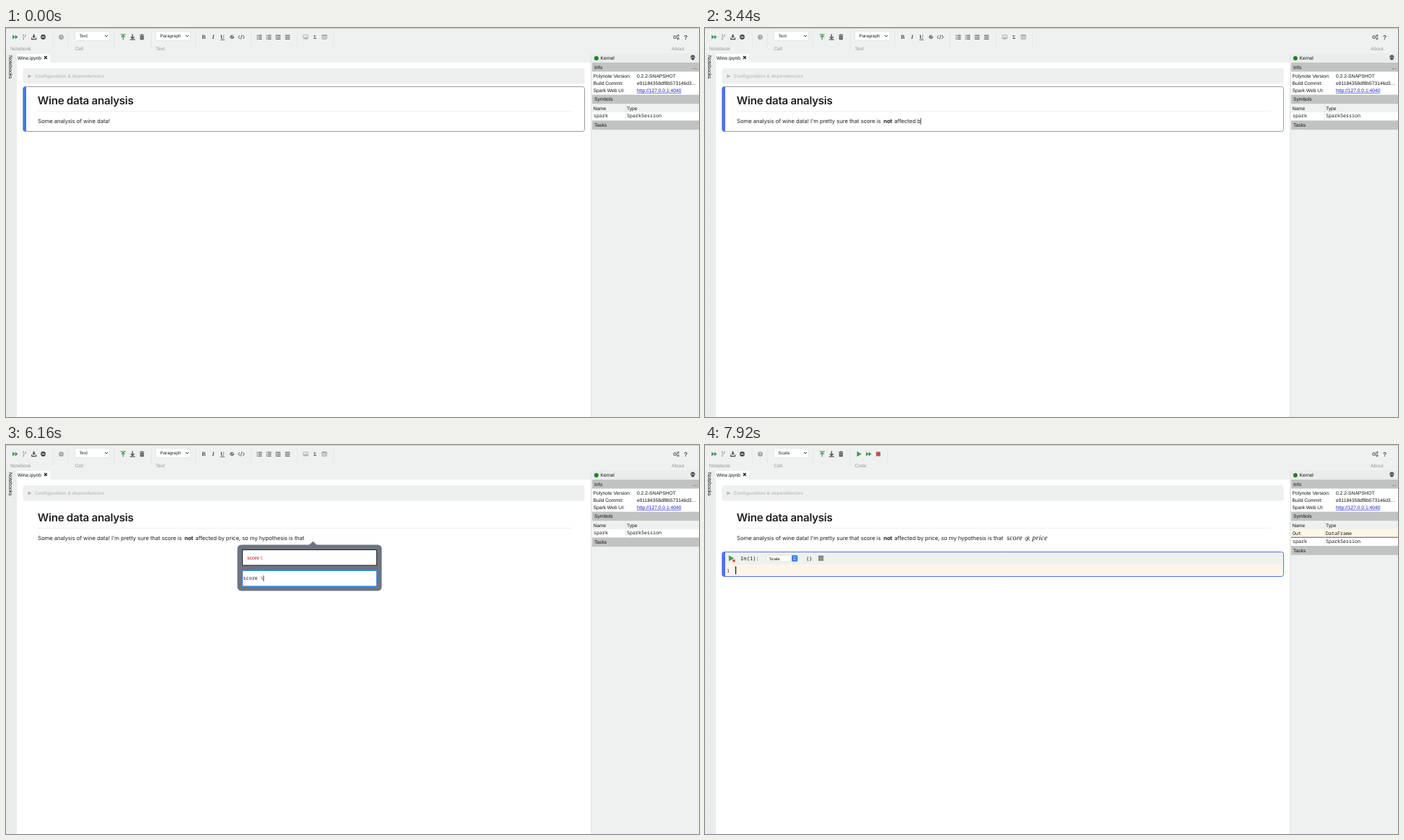
Recreate the animation shown at these times as an HTML page with a canvas. Size 960 by 540 pixels, loop 8000 ms.

```html
<!DOCTYPE html>
<html lang="en">
<head>
<meta charset="utf-8">
<title>Notebook</title>
<style>
  html, body { margin: 0; width: 100%; height: 100%; overflow: hidden; background: #fff; }
  canvas { display: block; width: 960px; height: 540px; }
</style>
</head>
<body>
<canvas id="stage"></canvas>
<script>
const LOOP = 8000, STEP = 80;
const SANS = '"Liberation Sans", Arial, sans-serif';
const INTER = 'Inter, sans-serif';
const MONO = '"Noto Sans Mono", "DejaVu Sans Mono", monospace';
const SERIF = '"Liberation Serif", Times, serif';
const UI = `6.7px ${SANS}`, CODE = `6.67px ${MONO}`, BODY = `7.75px ${INTER}`;
const BG = '#eff1f0', DARK = '#4b4b4b', PALE = '#a4a6a5', GREEN = '#479b55', BLUE = '#4b74e6';
const CREAM = '#fdf6e8';

const canvas = document.getElementById('stage');
const ctx = canvas.getContext('2d');
const dpr = window.devicePixelRatio || 1;
canvas.width = 960 * dpr;
canvas.height = 540 * dpr;
ctx.scale(dpr, dpr);
ctx.textRendering = 'geometricPrecision';

function rect(x, y, w, h, fill) {
  ctx.fillStyle = fill;
  ctx.fillRect(x, y, w, h);
}

function box(x, y, w, h, r, fill, stroke, weight = 1) {
  ctx.beginPath();
  ctx.roundRect(x, y, w, h, r);
  if (fill) { ctx.fillStyle = fill; ctx.fill(); }
  if (stroke) { ctx.strokeStyle = stroke; ctx.lineWidth = weight; ctx.stroke(); }
}

function disc(x, y, r, fill) {
  ctx.beginPath();
  ctx.arc(x, y, r, 0, 7);
  ctx.fillStyle = fill;
  ctx.fill();
}

function poly(fill, ...p) {
  ctx.beginPath();
  for (let i = 0; i < p.length; i += 2) ctx.lineTo(p[i], p[i + 1]);
  ctx.closePath();
  ctx.fillStyle = fill;
  ctx.fill();
}

function line(stroke, weight, ...p) {
  ctx.beginPath();
  for (let i = 0; i < p.length; i += 2) ctx.lineTo(p[i], p[i + 1]);
  ctx.strokeStyle = stroke;
  ctx.lineWidth = weight;
  ctx.stroke();
}

// Draws text on a baseline and returns its right edge.
function text(s, x, y, font = UI, fill = '#111', spacing = 0, align = 'left') {
  ctx.font = font;
  ctx.letterSpacing = spacing + 'px';
  ctx.textAlign = align;
  ctx.fillStyle = fill;
  ctx.fillText(s, x, y);
  return x + ctx.measureText(s).width;
}

function stripes(x, y, w, h) {
  rect(x, y, w, h, '#f0f1f1');
  for (let i = 0; i < h; i += 2) rect(x, y + i, w, 1, '#e5e7e6');
}

function separator(x) {
  for (let y = 5; y < 28; y += 2) rect(x, y, 1, 1, '#dcdedd');
}

function triangle(x, y, w, h, fill) {
  poly(fill, x, y - h / 2, x + w, y, x, y + h / 2);
}

function select(label, x, w) {
  box(x + .5, 4.5, w - 1, 13, 2, '#fff', '#dedfdf', .7);
  text(label, x + 6.5, 13.2, `6.2px ${SANS}`, '#222');
  line('#333', 1, x + w - 7, 10, x + w - 5, 12, x + w - 3, 10);
}

function fastForward(x, y) {
  triangle(x, y, 4, 6, GREEN);
  triangle(x + 3.7, y, 4, 6, GREEN);
}

function barArrow(x, dir, color) {
  const y = 12.5;
  rect(x - 3.5, dir < 0 ? 8.5 : 15.5, 7, 1.2, color);
  line(color, 1.3, x, y - 3 * dir + (dir < 0 ? 1 : -1), x, y + 2 * dir);
  line(color, 1.3, x - 2.5, y - .2 * dir, x, y + 2.2 * dir, x + 2.5, y - .2 * dir);
}

function listIcon(x, kind) {
  for (let i = 0; i < 3; i++) {
    const y = 9.7 + i * 2.5;
    const inset = kind === 'indent' || kind === 'outdent';
    const full = inset && i !== 1;
    rect(full ? x - 3.3 : x - 1.4, y, full ? 6.6 : 4.8, 1.1, DARK);
    if (kind === 'bullet') rect(x - 3.5, y, 1.2, 1.2, DARK);
    if (kind === 'number') rect(x - 3.2, y - .2, .8, 1.6, DARK);
  }
  if (kind === 'indent') triangle(x - 3.4, 12.7, 1.8, 2.6, DARK);
  if (kind === 'outdent') triangle(x - 1.7, 12.7, -1.8, 2.6, DARK);
}

function gear(x, y, r) {
  ctx.beginPath();
  ctx.arc(x, y, r, 0, 7);
  ctx.setLineDash([.9, .5]);
  ctx.strokeStyle = DARK;
  ctx.lineWidth = 1.5;
  ctx.stroke();
  ctx.setLineDash([]);
}

function toolbar(code, bold) {
  rect(0, 0, 960, 36, BG);
  rect(0, 0, 960, 1, '#c9cbca');

  fastForward(9, 12.5);
  line(PALE, .8, 24, 9.5, 24, 15.5);
  line(PALE, .8, 24, 13.5, 27, 12, 27, 10);
  for (const [x, y] of [[24, 9.5], [24, 15.5], [27, 10]]) disc(x, y, .9, PALE);
  rect(37.7, 8.8, 1.8, 3, DARK);
  poly(DARK, 36, 11.4, 41.2, 11.4, 38.6, 14);
  line(DARK, 1.3, 35.7, 13.5, 35.7, 15.6, 41.6, 15.6, 41.6, 13.5);
  disc(51.5, 12.5, 3.4, DARK);
  rect(49.6, 12, 3.8, 1.1, BG);
  disc(76.5, 12.7, 3.4, PALE);
  line(BG, .8, 76.5, 10.7, 76.5, 12.9, 78, 13.4);
  [65, 86, 149, 201].forEach(separator);

  select(code ? 'Scala' : 'Text', 95, 49);
  barArrow(162.3, -1, GREEN);
  barArrow(175.3, 1, DARK);
  rect(185.3, 9.3, 6, 1, DARK);
  rect(187.2, 8.5, 2.2, 1, DARK);
  rect(185.8, 10.8, 5, 5.4, DARK);
  line(BG, .5, 187.4, 11.6, 187.4, 15.2);
  line(BG, .5, 189.2, 11.6, 189.2, 15.2);

  text('Notebook', 6, 30.6, UI, '#929493');
  text('Cell', 95.5, 30.6, UI, '#929493');
  text(code ? 'Code' : 'Text', 207.5, 30.6, UI, '#929493');
  text('About', 922, 30.6, UI, '#929493');
  if (code) {
    triangle(210.5, 12.5, 6.5, 7.4, GREEN);
    fastForward(223, 12.5);
    rect(237, 9.5, 6, 6, '#c9514b');
    separator(252);
  } else textTools(bold);

  gear(926.7, 12.6, 1.8);
  gear(931, 10.6, 1);
  gear(931, 14.7, 1);
  text('?', 941.5, 15.6, `bold 8.5px ${SANS}`, DARK, 0, 'center');
}

function textTools(bold) {
  select('Paragraph', 207, 49);
  if (bold) box(268, 6, 12, 13, 2, '#fff');
  const icon = (s, x, style) => text(s, x, 15.4, `${style} 8px ${SERIF}`, DARK, 0, 'center');
  icon('B', 274, 'bold');
  icon('I', 287, 'italic bold');
  icon('U', 300, 'bold');
  rect(297, 16.1, 6, .8, DARK);
  text('S', 313, 15.3, `bold 7.5px ${SANS}`, DARK, 0, 'center');
  rect(309.6, 12.3, 6.8, .8, DARK);
  line(DARK, 1, 323.8, 10.2, 321.8, 12.6, 323.8, 15);
  line(DARK, 1, 328.2, 10.2, 330.2, 12.6, 328.2, 15);
  line(DARK, .9, 326.8, 9.5, 325.2, 15.7);

  ['bullet', 'number', 'indent', 'outdent'].forEach((kind, i) => listIcon(351 + 13 * i, kind));
  box(411.8, 9.9, 6.6, 5.2, .5, null, PALE, .9);
  poly(PALE, 412.5, 14.6, 414.2, 12.3, 415.3, 13.3, 416.5, 12, 417.8, 14.6);
  text('Σ', 428, 15.1, `bold 7px ${SERIF}`, DARK, 0, 'center');
  box(437.8, 9.6, 6.6, 5.8, .5, null, PALE, .9);
  rect(437.8, 9.6, 6.6, 1.5, PALE);
  line(PALE, .7, 438, 13.1, 444.2, 13.1);
  line(PALE, .7, 440, 10, 440, 15.2);
  line(PALE, .7, 442.2, 10, 442.2, 15.2);
  [262, 339, 403, 453].forEach(separator);
}

function leftStrip() {
  stripes(0, 36, 15, 504);
  ctx.save();
  ctx.translate(4.2, 38);
  ctx.rotate(Math.PI / 2);
  text('Notebooks', 0, 0, `6.8px ${SANS}`);
  ctx.restore();
  rect(15, 35, 795, 13, BG);
  rect(15, 36, 46, 12, '#fff');
  text('Wine.ipynb', 16, 44.2, `6.67px ${SANS}`);
  line('#222', 1.3, 53, 39, 56.8, 43);
  line('#222', 1.3, 56.8, 39, 53, 43);
}

function section(label, y) {
  rect(812, y, 148, 12.7, '#c1c2c2');
  text(label, 815, y + 8.6);
}

function symbolRow(y, name, type) {
  text(name, 814, y + 7.4, CODE);
  text(type, 860, y + 7.4, CODE);
}

function kernelPanel(hasOut) {
  rect(810, 36, 150, 504, BG);
  rect(810, 36, 1, 504, '#e2e4e3');
  stripes(812, 36, 148, 12);
  disc(817.8, 42, 3, '#1c8420');
  text('Kernel', 823.5, 43.7);
  disc(951.4, 40.6, 3, DARK);
  rect(949.8, 42, 3.3, 2.4, DARK);
  disc(950.2, 40.8, .8, BG);
  disc(952.6, 40.8, .8, BG);

  section('Info', 48);
  text('...', 951.5, 56.6);
  rect(812, 60.7, 148, 32, '#fff');
  [['Polynote Version:', '0.2.2-SNAPSHOT'], ['Build Commit:', 'e91184358df8b573146d3…'],
   ['Spark Web UI:', 'http://127.0.0.1:4040']].forEach(([key, value], i) => {
    const y = 69.1 + 10 * i;
    text(key, 813.5, y);
    const end = text(value, 874, y, UI, i === 2 ? '#1414e0' : '#111');
    if (i === 2) rect(874, y + .8, end - 874, .6, '#1414e0');
  });

  section('Symbols', 92.7);
  rect(812, 105.4, 148, 11.6, BG);
  text('Name', 813.5, 113.7);
  text('Type', 860, 113.7);
  const rows = hasOut ? 2 : 1;
  rect(812, 117, 148, 11.5 * rows, '#fff');
  if (hasOut) {
    rect(812, 117, 148, 11, CREAM);
    rect(812, 127.7, 148, 1, '#555');
    symbolRow(117.3, 'Out', 'DataFrame');
  }
  symbolRow(117 + 11.5 * (rows - 1), 'spark', 'SparkSession');
  rect(858, 106, .7, 11 + 11.5 * rows, '#dddfde');
  section('Tasks', 117 + 11.5 * rows);
}

function italic(s, x, y, em) {
  return text(s, x, y, `italic ${em * 1.03}px ${SERIF}`, '#111', em * .014);
}

function propto(x, y, em) {
  const c = (...p) => ctx.bezierCurveTo(...p.map((v, i) => i % 2 ? y + v * em : x + v * em));
  ctx.beginPath();
  ctx.moveTo(x + .72 * em, y - .43 * em);
  c(.5, -.43, .42, 0, .22, 0);
  c(0, 0, 0, -.43, .22, -.43);
  c(.42, -.43, .5, 0, .72, 0);
  ctx.strokeStyle = '#111';
  ctx.lineWidth = em * .065;
  ctx.stroke();
}

// Renders the formula typed so far; unknown commands stay red.
function math(tex, x, y, em) {
  const [, word, cmd, rest] = tex.match(/^(\w*) ?(\S*) ?(.*)$/);
  italic(word, x, y, em);
  const px = x + 2.58 * em;
  const red = s => text(s, px, y, `${em * .85}px ${SANS}`, '#cc0000');
  if (cmd.startsWith('\\not')) {
    line('#111', em * .065, px + .27 * em, y + .17 * em, px + .51 * em, y - .62 * em);
    if (cmd.endsWith('\\propto')) propto(px, y, em);
    else red(cmd.slice(4));
  } else red(cmd);
  italic(rest, x + 3.64 * em, y, em);
}

function popup(tex) {
  const broken = tex.endsWith('\\');
  const h = !tex ? 15 : broken ? 22.5 : 25;
  const top = 145, input = top + h + 6.5;
  const slate = '#6e7480';
  poly(slate, 419, 139.5, 425.3, 133.7, 431.5, 139.5);
  box(320.5, 138.5, 200, input + h + 6 - 138.5, 5.5, slate);
  box(327.5, top + .5, 186, h - 1, 0, '#fff', '#222');
  box(327.3, input + .3, 186.4, h - .6, .5, '#fff', '#3f86dc', 1.6);

  const base = input + h / 2 + 2;
  if (!tex) text('TeX equation definition', 328.5, base, CODE, '#777');
  const end = text(tex, 328.5, base, CODE);
  rect(end, base - 6, .8, 8, '#111');
  if (tex.length > 17) {
    ctx.setLineDash([1, .8]);
    line('#e0443c', .8, 372.5, base + 1.8, 396.5, base + 1.8);
    ctx.setLineDash([]);
  }
  if (broken) text(tex, 334, 158.6, `6.9px ${SANS}`, '#cc0000');
  else if (tex) math(tex, 334, 159, 8.1);
}

function textCell(parts, focused, caret, formula) {
  if (focused) {
    box(24, 81.5, 777.5, 62, 3, '#fff', '#9b9b9b');
    box(23.5, 81.5, 4.5, 62, [3, 0, 0, 3], BLUE);
  }
  text('Wine data analysis', 43.8, 106.1, `600 15.2px ${INTER}`, '#222', -.3);
  rect(44, 115, 740, 1, '#eeeeee');
  const y = 132.2;
  let end = text(parts[0], 44, y, BODY, '#222', -.09);
  if (parts[1]) end = text(parts[1], 247.2, y, `bold ${BODY}`, '#222', -.13);
  if (parts[2]) end = text(parts[2], 260.2, y, BODY, '#222', -.09);
  if (formula) {
    math(TEX, 418, y, 9.7);
    end = 475;
  }
  if (caret) rect(end, 125, .8, 9, '#222');
}

function codeCell() {
  box(24, 148.5, 777.5, 34, 3, BG);
  rect(28, 166, 773, 16, CREAM);
  box(24, 148.5, 777.5, 34, 3, null, BLUE);
  box(23.5, 148.5, 4.5, 34, [3, 0, 0, 3], BLUE);
  triangle(33, 157.3, 7.3, 8, GREEN);
  rect(38.2, 159, 3.5, 3.5, '#d0564f');
  text('In(1):', 49, 160, `7.2px ${MONO}`);
  box(85.5, 153, 43, 8.8, 1.5, '#fff', '#d4d6d5', .6);
  text('Scala', 89, 159.5, `5.8px ${SANS}`);
  box(120, 153, 8.3, 8.8, 1.5, '#3f82e8');
  line('#fff', .8, 122.6, 156.6, 124.1, 155, 125.6, 156.6);
  line('#fff', .8, 122.6, 158.2, 124.1, 159.8, 125.6, 158.2);
  text('{}', 140, 159.8, `7px ${MONO}`, '#222');
  for (let i = 0; i < 4; i++) rect(157, 153.8 + 1.9 * i, 7.2, 1, '#333');
  text('1', 30, 176.6, `7px ${MONO}`, '#333');
  rect(42, 168.5, 1.2, 11, '#111');
}

const OPENING = 'Some analysis of wine data!';
const CLAIM = " I'm pretty sure that score is ";
const REASON = ' affected by price, so my hypothesis is that ';
const TEX = '\\not\\propto'.replace(/^/, 'score ') + ' price';

// Keystrokes: each key list is [time, characters typed by then].
function typed(s, t, ...keys) {
  let n = 0;
  for (let i = 1; i < keys.length; i++) {
    const [t0, n0] = keys[i - 1], [t1, n1] = keys[i];
    if (t >= t0) n = Math.round(n0 + (n1 - n0) * Math.min(1, (t - t0) / (t1 - t0)));
  }
  return s.slice(0, n);
}

function draw(ms) {
  const t = Math.floor(ms / STEP) * STEP;
  const code = t >= 7760;
  const editing = t >= 5680 && t < 7680;

  rect(0, 0, 960, 540, '#fff');
  toolbar(code, t >= 1840 && t < 2400);
  leftStrip();
  kernelPanel(t >= 7840);

  box(23.5, 56, 778, 21.5, 3, '#eeefef');
  triangle(30.5, 67, 5, 5, '#b3b5b4');
  text('Configuration & dependencies', 40, 69.4, `bold 6.62px ${SANS}`, '#bfc1c0');

  const parts = [
    OPENING + typed(CLAIM, t, [0, 0], [1680, CLAIM.length]),
    typed('not', t, [1840, 0], [2080, 3]),
    typed(REASON, t, [2640, 0], [3440, 11], [5400, REASON.length])
  ];
  textCell(parts, !editing && !code, t > 0 && !editing && !code, t >= 7680);
  if (editing) popup(typed(TEX, t, [5680, 0], [6480, 11], [6640, 13], [6720, 13], [7360, TEX.length]));
  if (code) codeCell();
}

function frame() {
  draw(performance.now() % LOOP);
  requestAnimationFrame(frame);
}
frame();
</script>
</body>
</html>
```
